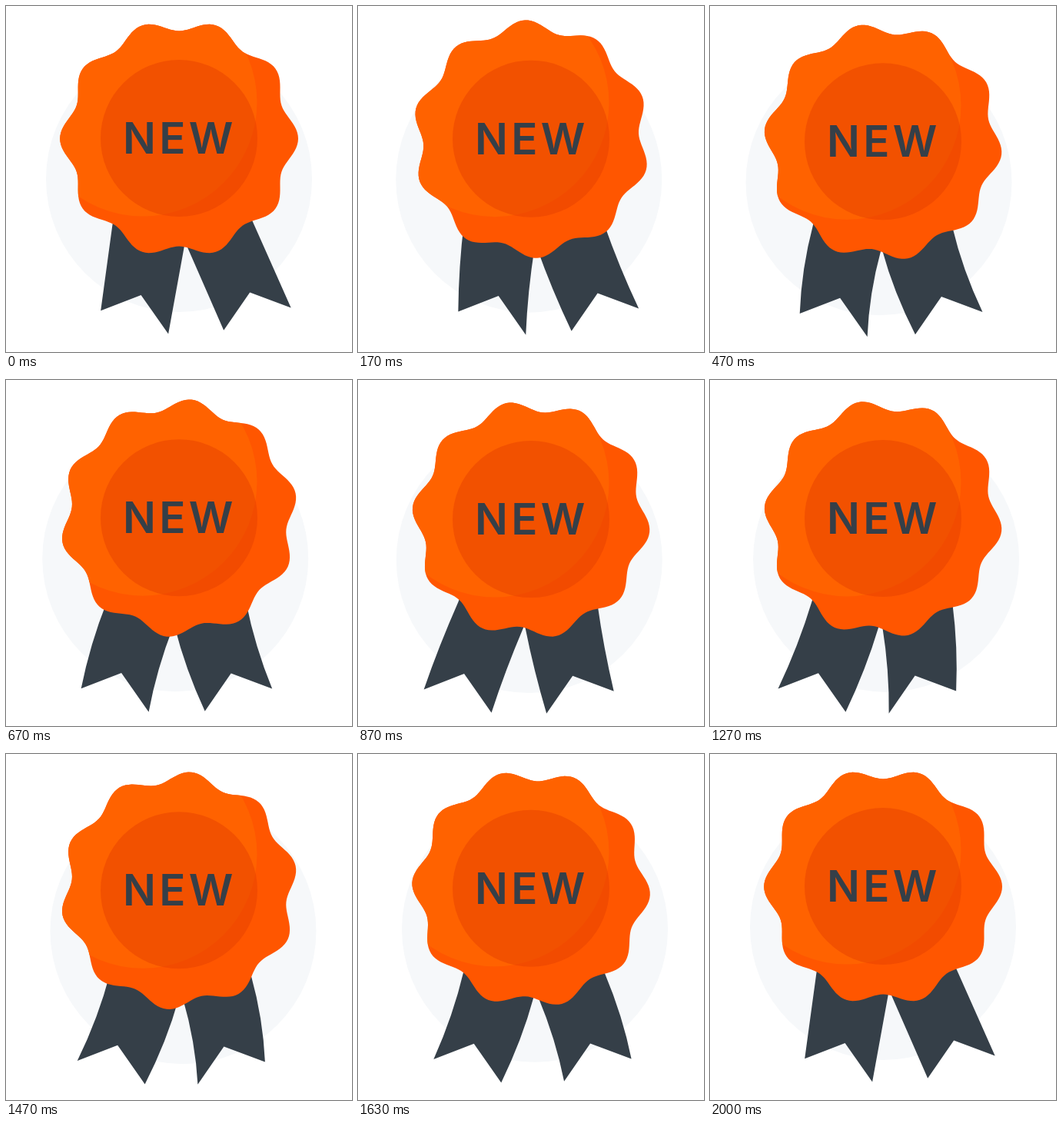
An HTML page that plays this animation: 450 px wide and 450 px high, repeating every 2030 ms.

```html
<!DOCTYPE html>
<html lang="en">
<head>
<meta charset="utf-8">
<title>New badge</title>
<style>
  html, body { margin: 0; width: 100%; height: 100%; overflow: hidden; background: #fff; }
  svg { display: block; width: 100%; height: 100%; }
  text { font: 600 56.5px Inter, "Open Sans", sans-serif; letter-spacing: 4.3px; }
</style>
</head>
<body>
<svg viewBox="0 0 450 450">
  <defs><clipPath id="badgeClip"><path class="badge"/></clipPath></defs>
  <g id="scene">
    <circle id="disc" cy="225" r="173" fill="#f6f8fa"/>
    <g fill="#353f48">
      <path id="left"/>
      <path id="right"/>
    </g>
    <path class="badge" fill="#ff5600"/>
    <circle cx="178" cy="125" r="148.5" fill="#ff6200" clip-path="url(#badgeClip)"/>
    <circle cx="225" cy="172" r="102" fill="#e64000" fill-opacity=".5"/>
    <text x="152" y="192" fill="#353f48">NEW</text>
  </g>
</svg>
<script>
const LOOP = 2030, FRAMES = 60, TAU = Math.PI * 2, DEG = TAU / 360;
const { sin, cos } = Math;
const $ = id => document.getElementById(id);
const badges = document.querySelectorAll('.badge');

// Rest shape of each ribbon and how its tail swings: reach in x, lift in y,
// delay in degrees, skew as the strength of the second harmonic.
const ribbons = {
  left: {
    outer: { anchor: 145, x: 134.7, y: 280, sway: 4.5 },
    inner: { anchor: 243, x: 223.5, y: 313, sway: 8.5 },
    corner: [103.6, 394.7], notch: [156, 374.4], tip: [191.5, 425],
    reach: 22, lift: 1.7, delay: 27, skew: 0.25
  },
  right: {
    outer: { anchor: 303, x: 317, y: 283, sway: 5.5 },
    inner: { anchor: 204, x: 227, y: 313, sway: 9.5 },
    corner: [347, 394.4], notch: [293.5, 374.4], tip: [259.5, 423.6],
    reach: 24.5, lift: -2, delay: 15, skew: -0.26
  }
};
const TAIL_LAG = 40;

function ribbonPath(r, phase) {
  const swing = cos(phase - r.delay * DEG) + r.skew * sin(2 * phase);
  const sway = cos(phase - (r.delay - TAIL_LAG) * DEG);
  const bend = -6.6 * sin(phase);
  const tail = ([x, y]) => [x + r.reach * swing, y + r.lift * swing];
  const top = edge => [edge.x + edge.sway * sway, edge.y];
  const curve = (a, b) => `Q${(a[0] + b[0]) / 2 + bend} ${(a[1] + b[1]) / 2} ${b}`;
  const outer = top(r.outer), inner = top(r.inner);
  const corner = tail(r.corner), notch = tail(r.notch), tip = tail(r.tip);
  return `M${r.outer.anchor} 240L${outer}${curve(outer, corner)}` +
    `L${notch}L${tip}${curve(tip, inner)}L${r.inner.anchor} 240Z`;
}

// Ten soft lobes around a circle.
function badgePath(turn) {
  const points = [];
  for (let i = 0; i < 240; i++) {
    const a = i / 240 * TAU;
    const radius = 147.5 + 7.4 * cos(10 * (a - turn));
    points.push([225.1 + radius * cos(a), 172.5 + radius * sin(a)]);
  }
  return 'M' + points.join('L') + 'Z';
}

function draw(ms) {
  const frame = Math.floor((ms % LOOP + 3.4) * 0.03) % FRAMES;
  const phase = frame / FRAMES * TAU;
  $('scene').setAttribute('transform', `translate(0 ${4.75 * (1 - cos(phase))})`);
  $('disc').setAttribute('cx', 225 - 5.5 * sin(phase));
  for (const side in ribbons) $(side).setAttribute('d', ribbonPath(ribbons[side], phase));
  const outline = badgePath(phase / 2);
  badges.forEach(b => b.setAttribute('d', outline));
}

const start = performance.now();
function tick() {
  draw(performance.now() - start);
  requestAnimationFrame(tick);
}
tick();
</script>
</body>
</html>
```
